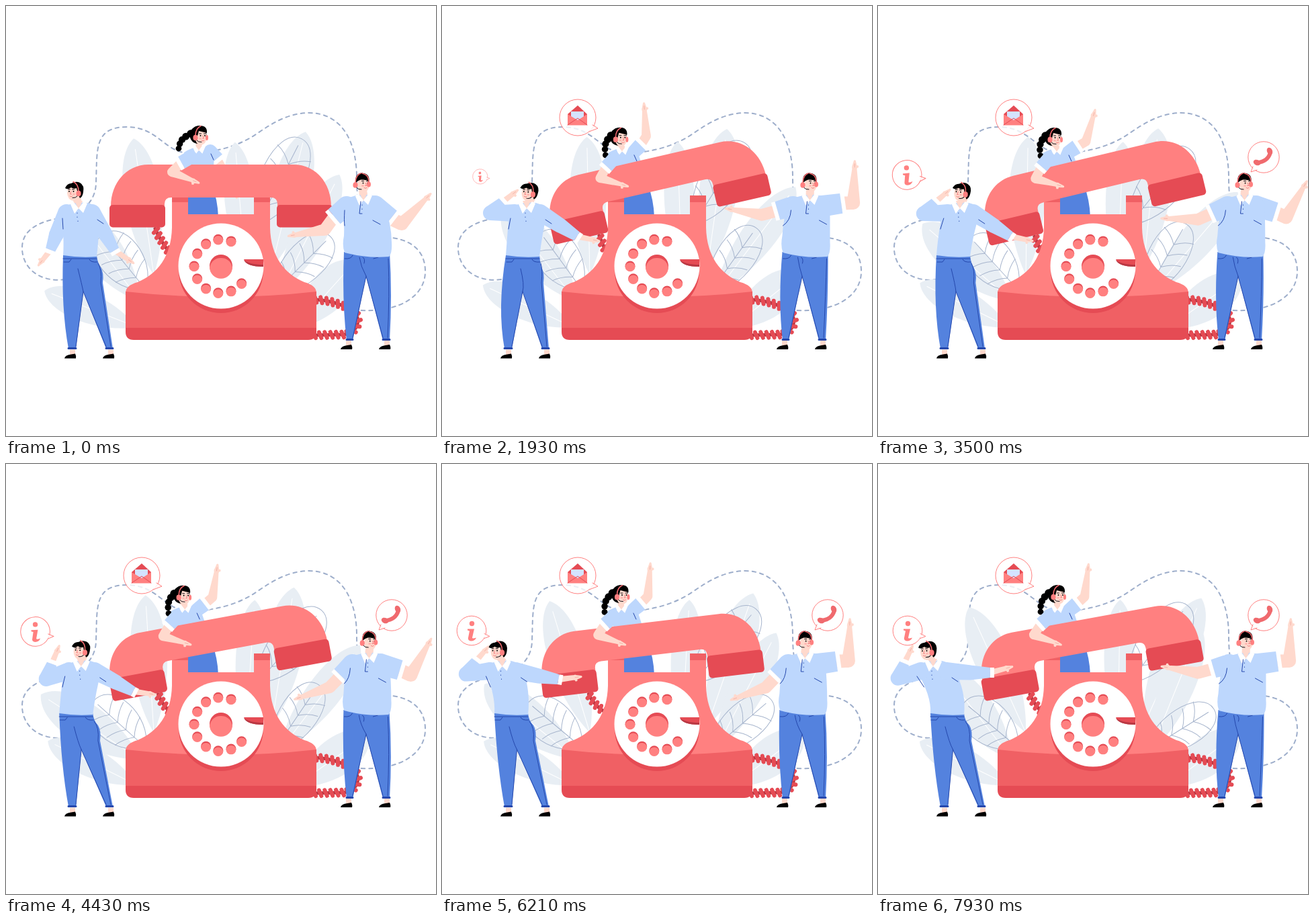
An HTML page that plays this animation: 640 by 640 pixels, repeating every 8000 ms.

```html
<!DOCTYPE html>
<html lang="en">
<head>
<meta charset="utf-8">
<title>Call centre</title>
<style>
html, body { margin: 0; width: 100%; height: 100%; overflow: hidden; background: #fff; }
svg { display: block; width: 100vw; height: 100vh; }
path { stroke-linecap: round; stroke-linejoin: round; }
.skin { fill: #ffd9cd; } .shirt { fill: #bdd7fd; } .jeans { fill: #5482de; }
.pink { fill: #ff8080; } .red { fill: #e54b54; } .mid { fill: #f06064; }
.white { fill: #fff; } .pale { fill: #e8eef4; }
.seam { fill: none; stroke: #2548ad; stroke-width: 1; }
.hem { fill: none; stroke: #2548ad; stroke-width: 3; }
.outline { fill: none; stroke: #a7b5cd; stroke-width: 1; }
.rib { fill: none; stroke: #fff; stroke-width: 1; }
.neck { stroke: #ffd9cd; stroke-width: 12; }
.band { fill: none; stroke: #f0686d; stroke-width: 1.6; }
.fine { fill: none; stroke: #f0686d; stroke-width: .8; }
.knuckle { fill: none; stroke: #f2a79d; stroke-width: .8; }
.ink { fill: none; stroke: #101018; stroke-width: 1; }
.bubble { fill: #fff; fill-opacity: .8; stroke: #ff8080; stroke-width: 1; }
</style>
</head>
<body>
<svg id="stage" viewBox="0 0 640 640">
  <path fill="none" stroke="#9eaecb" stroke-width="2" stroke-dasharray="5.5 6" d="M88 407C50 412 24 390 24 360C24 330 55 319 85 315C115 308 134 290 134 262C136 215 130 180 180 180C225 180 235 216 270 219C310 219 345 209 372 191C398 173 420 160 450 159C505 159 522 210 522 255C522 300 530 340 575 345C610 350 624 370 624 395C624 432 585 456 528 453"/>
  <g id="leaves"></g>
  <g id="womanBack"></g>
  <g id="cords"></g>

  <g id="base">
    <path class="pink" d="M247 288H271V310H369V286H393V330C394 373 415 399 444 411Q462 416 462 427V440H178V427Q178 416 196 411C225 399 246 373 247 330Z"/>
    <path class="mid" d="M247 285H271V292H247ZM369 282H393V292H369ZM178 425Q320 441 462 425V484H178Z"/>
    <path class="red" d="M178 479H462V485Q462 497 450 497H190Q178 497 178 485Z"/>
    <circle class="red" cx="320" cy="394" r="63"/>
    <circle class="white" cx="320" cy="387" r="63.5"/>
    <path class="red" d="M354 377H383V388Q358 388 354 377Z"/>
    <path fill="#b93843" d="M354 378Q362 385 383 385V388Q358 388 354 378Z"/>
  </g>

  <g id="handset">
    <path class="pink" d="M-164 -14C-164 -52 -138 -76.5 -108 -76.5H108C140 -76.5 164 -50 164 -14H84V-18Q84 -27.5 74 -27.5H-74Q-84 -27.5 -84 -18V-14Z"/>
    <rect class="red" x="-166" y="-16.5" width="83" height="33.5" rx="5"/>
    <rect class="red" x="83" y="-16.5" width="83" height="33.5" rx="5"/>
  </g>
  <g id="womanFront"></g>
  <g id="men"></g>

  <g id="mail">
    <circle class="bubble" cx="-30" cy="-16" r="27"/>
    <path class="bubble" d="M-8 -5L0 0L-13 5"/>
    <path class="red" d="M-45 -21L-30 -34L-16 -21V-8H-45Z"/>
    <path fill="#d4e3ff" d="M-40 -25H-21V-8H-40Z"/>
    <path class="pink" d="M-45 -21L-30 -12L-16 -21V-4.5H-45Z"/>
    <path fill="none" stroke="#e54b54" d="M-45 -5L-30 -15L-16 -5"/>
  </g>
  <g id="info">
    <circle class="bubble" cx="-27" cy="-8.500" r="21.8"/>
    <path class="bubble" d="M-8 -4L0 0L-8 3"/>
    <circle class="pink" cx="-26.5" cy="-19" r="3.7"/>
    <path class="pink" d="M-33 -11H-23L-26 2Q-26 4 -20 2Q-22 7 -28 7Q-33 6 -32 2L-30 -8L-33 -9Z"/>
  </g>
  <g id="call">
    <circle class="bubble" cx="19" cy="-22" r="23.2"/>
    <path class="bubble" d="M3 -8L0 0L9 -3"/>
    <path fill="none" stroke="#f06a6e" stroke-width="6" d="M9 -14Q25 -15 29 -29"/>
    <ellipse fill="#f06a6e" cx="9" cy="-14" rx="5.5" ry="4" transform="rotate(25 9 -14)"/>
    <ellipse fill="#f06a6e" cx="28" cy="-31" rx="4" ry="5.5" transform="rotate(-25 28 -31)"/>
  </g>
</svg>
<script>
const LOOP = 8000, FRAMES = 112, RAD = Math.PI / 180;
const $ = id => document.getElementById(id);
const updates = [];

function add(parent, tag, attrs = {}) {
  const el = document.createElementNS('http://www.w3.org/2000/svg', tag);
  for (const k in attrs) el.setAttribute(k, attrs[k]);
  return parent.appendChild(el);
}
const shape = (parent, cls, d = '') => add(parent, 'path', { class: cls, d });
const group = parent => add(parent, 'g');
const trace = (el, d) => el.setAttribute('d', d);
const place = (el, x, y, extra = '') => el.setAttribute('transform', `translate(${x} ${y}) ${extra}`);

const clamp = (v, low, high) => Math.min(Math.max(v, low), high);
const mix = (a, b, u) => a + (b - a) * u;
const ease = u => 0.5 - 0.5 * Math.cos(Math.PI * u);

// Rises from rest to pose a, then from `peak` on swings between a and b, one way per `half` ms.
const motion = (rest, a, b, { rise, peak = rise, half, turns = Infinity }) => t => {
  const up = ease(clamp(t / rise, 0, 1));
  const swing = ease(clamp((t - peak) / half, 0, turns));
  return rest.map((v, i) => mix(mix(v, a[i], up), b[i], swing));
};

// Leaves sway about their foot: rest, first and second angle.
const BREEZE = { rise: 3000, half: 4900, turns: 1 };
const LATE = { rise: 5100, half: 2800, turns: 1 };
function leaf(x, y, len, w, [rest, a, b], timing = BREEZE, outlined = false) {
  const g = group($('leaves'));
  const top = len * (outlined ? 1 : 0.88), low = len * (outlined ? 0.25 : 0.35);
  shape(g, outlined ? 'outline' : 'pale', `M0 0C${-w} ${-low} ${-w} ${-top} 0 ${-len}C${w} ${-top} ${w} ${-low} 0 0Z`);
  let veins = `M0 0V${-len * 0.92}`;
  if (outlined) for (let k = 0.22; k < 0.85; k += 0.16)
    for (const s of [-w, w]) veins += `M0 ${-len * k}Q${s * .3} ${-len * (k + .1)} ${s * .66} ${-len * (k + .13)}`;
  shape(g, outlined ? 'outline' : 'rib', veins);
  const angle = motion([rest], [a], [b], timing);
  updates.push(t => place(g, x, y, `rotate(${angle(t)})`));
}
leaf(200, 440, 177, 40, [-37, -38, -58], { rise: 1900, half: 3000, turns: 2 });
leaf(195, 478, 148, 30, [-68.6, -63.6, -64]);
leaf(430, 480, 135, 38, [42, 55, 53]);
leaf(220, 400, 205, 36, [-8.4, 1.6, -24.4]);
leaf(357, 400, 198, 30, [-4.7, 4.2, 1], LATE);
leaf(395, 390, 209, 38, [14.1, 5.6, 24.4]);
leaf(405, 430, 201, 34, [27, 41, 22]);
leaf(375, 325, 143, 42, [27, 42, 36.7], LATE, true);
leaf(208, 422, 104, 42, [-39, -36, -50], { rise: 2000, half: 3200, turns: 1 }, true);
leaf(398, 428, 120, 38, [45, 30, 58], { rise: 3300, half: 4500, turns: 1 }, true);

// Dial
function hole(x, y, r) {
  add($('base'), 'circle', { class: 'red', cx: x, cy: y, r });
  shape($('base'), 'pink', `M${x - r} ${y + r * .1}A${r} ${r} 0 0 0 ${x + r} ${y + r * .1}Q${x + r * .75} ${y - r * .7} ${x} ${y - r * .7}Q${x - r * .75} ${y - r * .7} ${x - r} ${y + r * .1}Z`);
}
hole(320, 387, 17);
for (let i = 0; i < 10; i++) {
  const a = (-68 - 28 * i) * RAD;
  hole(320 + 40 * Math.cos(a), 387 + 40 * Math.sin(a), 7.5);
}

// Curly cords
const ruler = document.createElementNS('http://www.w3.org/2000/svg', 'path');
function coil(d) {
  trace(ruler, d);
  const len = ruler.getTotalLength();
  let out = '';
  for (let s = 3; s < len; s += 8.4) {
    const p = ruler.getPointAtLength(s), q = ruler.getPointAtLength(s + 1);
    const a = Math.atan2(q.y - p.y, q.x - p.x) + 1.2;
    const dx = 4.6 * Math.cos(a), dy = 4.6 * Math.sin(a);
    out += `M${p.x - dx} ${p.y - dy}L${p.x + dx} ${p.y + dy}`;
  }
  return out;
}
function cord() {
  const wire = (stroke, width) => add($('cords'), 'path', { fill: 'none', stroke, 'stroke-width': width });
  const under = wire('#b83742', 5), over = wire('#e54b54', 6);
  return d => { trace(under, d); trace(over, coil(d)); };
}
cord()('M458 437C485 438 500 445 514 452C530 462 526 486 503 489L458 490');
const leftCord = cord();

const handset = motion([320, 312.5, 0], [326, 300, -14.8], [313.5, 312, -6.8], { rise: 2500, half: 3700 });
updates.push(t => {
  const [x, y, tilt] = handset(t), c = Math.cos(tilt * RAD), s = Math.sin(tilt * RAD);
  place($('handset'), x, y, `rotate(${tilt})`);
  const cx = x - 98 * c - 19 * s, cy = y - 98 * s + 19 * c;
  leftCord(`M${cx} ${cy}Q${cx + 7} ${cy + 17} 247 372`);
});

// Limbs are tapered segments with round joints.
const disc = ([x, y], r) => `M${x - r} ${y}a${r} ${r} 0 1 0 ${2 * r} 0a${r} ${r} 0 1 0 ${-2 * r} 0Z`;
function taper(a, b, ra, rb) {
  const dx = b[0] - a[0], dy = b[1] - a[1], l = Math.hypot(dx, dy) || 1, nx = -dy / l, ny = dx / l;
  return `M${a[0] + nx * ra} ${a[1] + ny * ra}L${b[0] + nx * rb} ${b[1] + ny * rb}L${b[0] - nx * rb} ${b[1] - ny * rb}L${a[0] - nx * ra} ${a[1] - ny * ra}Z`;
}
const step = ([x, y], angle, length) => [x + Math.cos(angle * RAD) * length, y + Math.sin(angle * RAD) * length];

// `angles` gives the directions of the three segments; a long sleeve covers two of them.
function arm(parent, shoulder, angles, [l0, l1, l2], [r0, r1, r2, r3], long = false) {
  const skin = shape(parent, 'skin'), cuff = shape(parent, 'white'), sleeve = shape(parent, 'shirt');
  const knuckle = shape(parent, 'knuckle');
  updates.push(t => {
    const [p, q, s] = angles(t);
    const a = shoulder(t), b = step(a, p, l0), c = step(b, q, l1), tip = step(c, s, l2);
    const palm = step(tip, s, -9), thumb = step(palm, s + 75, 6);
    const hand = disc(palm, r3) + taper(palm, tip, r3, 1.6) + disc(tip, 1.6) + taper(palm, thumb, 3, 1.4);
    const upper = disc(a, r0) + taper(a, b, r0, r1);
    if (long) {
      trace(sleeve, upper + disc(b, r1) + taper(b, c, r1, r2));
      trace(cuff, taper(c, step(c, q, 6), r2, r2));
      trace(skin, taper(c, palm, r2 * .6, r3 * .9) + hand);
    } else {
      trace(sleeve, upper);
      trace(cuff, taper(b, step(b, p, 6), r1, r1));
      trace(skin, taper(b, c, r2, r2) + disc(c, r2) + taper(c, palm, r2, r3 * .8) + hand);
    }
    const nail = step(tip, s, -4);
    trace(knuckle, `M${palm}L${nail}`);
  });
}

function collar(parent) {
  const g = group(parent);
  shape(g, 'skin', 'M-6 -5H6L0 8Z');
  shape(g, 'white', 'M-8 -4L0 6L-6 14L-12 0ZM8 -4L0 6L7 13L13 -1Z');
  return g;
}
// `look` is -1 for a face turned left, 1 for right.
function face(parent, look) {
  add(parent, 'ellipse', { class: 'skin', cx: look * 2, cy: 4, rx: 9, ry: 11.5 });
  shape(parent, 'ink', `M${look * 8 - 1.5} -1h3M${look * 1.5 - 2} -1h3`);
  for (const x of [look * 8, look * 1.5]) add(parent, 'circle', { cx: x, cy: 2, r: 1 });
  add(parent, 'ellipse', { fill: '#ffb5b0', cx: look, cy: 6, rx: 2, ry: 1.5 });
  shape(parent, 'fine', `M${look * 5} 2l${look * 1.5} 4h${-look * 2}M${look * 3} 9q${look * 2} 2 ${look * 4} 0`);
}
function headset(parent, x, look) {
  shape(parent, 'band', `M${x} 2Q${x} -9 ${x + look * 8} -12.5`);
  add(parent, 'ellipse', { class: 'pink', cx: x, cy: 5, rx: 3.6, ry: 4.3 });
  shape(parent, 'ink', `M${x + look * 2} 9q${look * 2} 3 ${look * 7} 2.5`);
}

function woman() {
  const back = $('womanBack'), front = $('womanFront');
  const timing = { rise: 2400, peak: 3300, half: 3600, turns: 1 };
  // Head, chest, braid end relative to the head.
  const body = motion([288, 191, 287, 210, -31, 21], [262, 194, 266, 212, -20, 29], [267, 193, 267, 212, -25, 27], timing);
  const shoulder = (dx, dy) => t => [body(t)[2] + dx, body(t)[3] + dy];

  const wave = motion([51, 61, 63], [-45, -58, -94], [-33, -29, -73], { rise: 1500, peak: 2000, half: 1700 });
  arm(back, shoulder(17, 6), wave, [15, 16, 49], [10, 11, 7, 4]);
  const torso = shape(back, 'shirt'), neck = shape(back, 'neck');
  shape(back, 'jeans', 'M267 268L306 264Q315 288 316 314H271V285Z');
  const neckline = collar(back), crease = shape(back, 'seam'), hair = group(back), head = group(back);
  const knots = Array.from({ length: 5 }, (_, i) => add(hair, 'circle', { r: 5.8 - i * .35 }));
  add(head, 'ellipse', { cx: -2, cy: 1, rx: 12.5, ry: 13 });
  face(head, 1);
  shape(head, '', 'M-12 2Q-12 -13 0 -13Q12 -13 11 -2Q3 -4 -1 -5Q-3 4 -6 10Z');
  headset(head, -6, 1);
  add(head, 'ellipse', { class: 'pink', cx: 11, cy: 5, rx: 2, ry: 4 });
  updates.push(t => {
    const [x, y, cx, cy, bx, by] = body(t);
    trace(torso, `M${cx - 22} ${cy + 8}Q${cx - 10} ${cy} ${cx} ${cy}Q${cx + 18} ${cy - 2} ${cx + 23} ${cy + 4}L308 270H268Z`);
    trace(crease, `M${cx + 18} ${cy + 10}l4 9M${cx - 17} ${cy + 28}l6 -5`);
    trace(neck, `M${x - 1} ${y + 10}L${cx} ${cy + 1}`);
    neck.style.strokeWidth = 9;
    place(neckline, cx, cy, 'scale(.75)');
    place(head, x, y);
    knots.forEach((knot, i) => {
      const u = i / 4, bow = Math.sin(u * Math.PI) * 4;
      knot.setAttribute('cx', x - 13 + (bx + 13) * u - bow);
      knot.setAttribute('cy', y + (by + 1) * u - 1 - bow * .5);
    });
  });
  const lean = motion([150, 135, 22], [130, 118, 16], [138, 124, 20], timing);
  arm(front, shoulder(-12, 15), lean, [16, 20, 43], [10, 10, 7, 3.5]);
}

function shoes(parent, xs, y) {
  for (const x of xs) {
    shape(parent, 'skin', `M${x + 8} ${y - 13}h8v8h-8Z`);
    shape(parent, '', `M${x} ${y}Q${x + 1} ${y - 5} ${x + 10} ${y - 6}L${x + 16} ${y - 7}Q${x + 18} ${y - 3} ${x + 17} ${y}Z`);
  }
}

function leftMan() {
  const g = group($('men'));
  // Neck, head and tilt follow one slow lean; the waist settles sooner.
  const lean = motion([108, 102, 274, 0], [126, 130, 275, 6], [82, 74, 276, -1], { rise: 1400, peak: 2500, half: 5000, turns: 1 });
  const waist = motion([110], [120], [103], { rise: 1700, peak: 2200, half: 2700, turns: 1 });
  const shoulder = dx => t => [lean(t)[0] + dx, 308];
  shoes(g, [87, 144], 524.5);
  const jeans = shape(g, 'jeans'), seam = shape(g, 'seam');
  shape(g, 'hem', 'M93 509.5H104M149 509.5H159');
  const neck = shape(g, 'neck'), torso = shape(g, 'shirt');
  const salute = motion([115, 111, 128], [180, 318, 322], [155, 282, 284], { rise: 1250, peak: 3200, half: 1800 });
  arm(g, shoulder(-18), salute, [36, 24, 29], [13, 11, 7.5, 4], true);
  const reach = motion([58, 60, 34], [32, 33, 12], [4, 0, -15], { rise: 1100, peak: 3300, half: 4500, turns: 1 });
  arm(g, shoulder(20), reach, [36, 29, 34], [13, 11, 7.5, 4], true);
  const neckline = collar(g), crease = shape(g, 'seam'), head = group(g);
  face(head, -1);
  shape(head, '', 'M-14 -3Q-11 -10 -5 -10Q2 -14 8 -11Q15 -7 13 3Q12 10 8 12L5 5L3 -3Q-2 -1 -5 -4Q-10 0 -14 -3Z');
  headset(head, 6, -1);
  updates.push(t => {
    const [n, x, y, tilt] = lean(t), [w] = waist(t);
    const fork = mix(115, w, .5) + 2.5, hip = mix(144, w + 34, .7);
    trace(jeans, `M${w - 25} 371H${w + 25}Q${w + 26} 382 ${hip - 3} 389Q${hip + 2} 397 ${hip} 412L159 510H149L${fork} 425L104 510H93Q82 450 ${w - 25} 371Z`);
    trace(seam, `M${w - 25} 376H${w + 25}M${w - 24} 381h8l3 -4M${w + 14} 377q2 5 12 4M${w - 3} 391Q${w + 3} 415 ${fork} 425L149 507M${fork} 425L104 507M${w + 27} 383Q${hip - 1} 392 ${hip - 3} 412L156 507`);
    trace(torso, `M${n - 26} 305Q${n - 15} 292 ${n} 293Q${n + 21} 290 ${n + 31} 304Q${w + 29} 340 ${w + 25} 373Q${w} 375 ${w - 25} 371Q${w - 23} 345 ${n - 26} 305Z`);
    trace(crease, `M${n - 24} 316L${(n + w) / 2 - 24} 332M${n + 28} 318l9 6M${n - 2} 308v.5M${n - 2} 314v.5M${n - 1} 320v.5`);
    trace(neck, `M${x + 3} ${y + 11}L${n} 297`);
    place(neckline, n, 295);
    place(head, x, y, `rotate(${tilt})`);
  });
}

function rightMan() {
  const g = group($('men'));
  const timing = { rise: 1900, peak: 2700, half: 2600 };
  // Waist, neck, head.
  const body = motion([538, 531, 530], [541.5, 546.5, 547], [536, 537, 538], timing);
  const shoulder = dx => t => [body(t)[1] + dx, 298];
  shoes(g, [498, 555], 511);
  const jeans = shape(g, 'jeans'), seam = shape(g, 'seam');
  shape(g, 'hem', 'M507 496.5H516M561 496.5H571');
  const neck = shape(g, 'neck');
  arm(g, shoulder(-24), motion([140, 126, 170], [164, 165, 190], [125, 124, 151], timing), [24, 24, 55], [15, 14, 9, 4]);
  const wave = motion([38, 25, -46], [-8, -3, -88], [22, 30, -55], { rise: 1150, peak: 2200, half: 1750, turns: 2 });
  arm(g, shoulder(18), wave, [30, 18, 62], [16, 15, 10, 4]);
  const torso = shape(g, 'shirt'), neckline = collar(g), crease = shape(g, 'seam'), head = group(g);
  face(head, 1);
  shape(head, '', 'M-10 2Q-11 -13 0 -13Q13 -12 10 2L8 -2Q3 -3 -2 -3Q-6 -2 -10 2Z');
  headset(head, -10, 1);
  shape(head, 'band', 'M0 -12.5Q11 -10 10 2');
  add(head, 'ellipse', { class: 'pink', cx: 10, cy: 4, rx: 3, ry: 4 });
  updates.push(t => {
    const [w, n, x] = body(t), y = 261.5;
    trace(jeans, `M${w - 35} 366H${w + 33}Q575 430 571 498H561L536 402L516 498H507Q500 440 ${w - 35} 366Z`);
    trace(seam, `M${w - 34} 376q10 1 12 -5M${w - 12} 374Q${w - 10} 388 536 402L516 494M536 402L561 494M${w - 7} 374q4 2 2 9M${w + 9} 376l7 -2M${w + 31} 376Q571 430 568 494`);
    trace(torso, `M${n - 31} 292Q${n - 17} 281 ${n} 281Q${n + 20} 279 ${n + 31} 292Q${w + 36} 325 ${w + 36} 352Q${w + 37} 368 ${w + 32} 373Q${w} 376 ${w - 34} 367Q${w - 38} 357 ${w - 35} 342Q${w - 34} 320 ${n - 31} 292Z`);
    trace(crease, `M${n - 27} 304Q${n - 28} 320 ${w - 34} 327M${n + 15} 319l11 6M${n - 3} 291l-2 18h4M${n - 1} 296v.5M${n - 1} 302v.5`);
    trace(neck, `M${x + 1} ${y + 10}L${n + 1} 284`);
    place(neckline, n + 1, 283);
    place(head, x, y);
  });
}

// Speech bubbles grow out of their tails, slightly past full size.
function bubble(id, start, x, y, tilt = () => 0) {
  updates.push(t => {
    const u = clamp((t - start) / 850, 0, 1) * 0.6 * Math.PI;
    place($(id), x, y, `rotate(${tilt(t)}) scale(${Math.sin(u) / Math.sin(0.6 * Math.PI)})`);
  });
}

woman();
leftMan();
rightMan();
bubble('mail', 290, 232, 182);
bubble('info', 1700, 71, 256.5, motion([-7], [-7], [0], { rise: 3500, half: 1700, turns: 1 }));
bubble('call', 2500, 555, 247);

const begin = performance.now(), tick = LOOP / FRAMES;
function draw() {
  const t = Math.floor((performance.now() - begin) % LOOP / tick) * tick;
  updates.forEach(update => update(t));
  requestAnimationFrame(draw);
}
draw();
</script>
</body>
</html>
```
